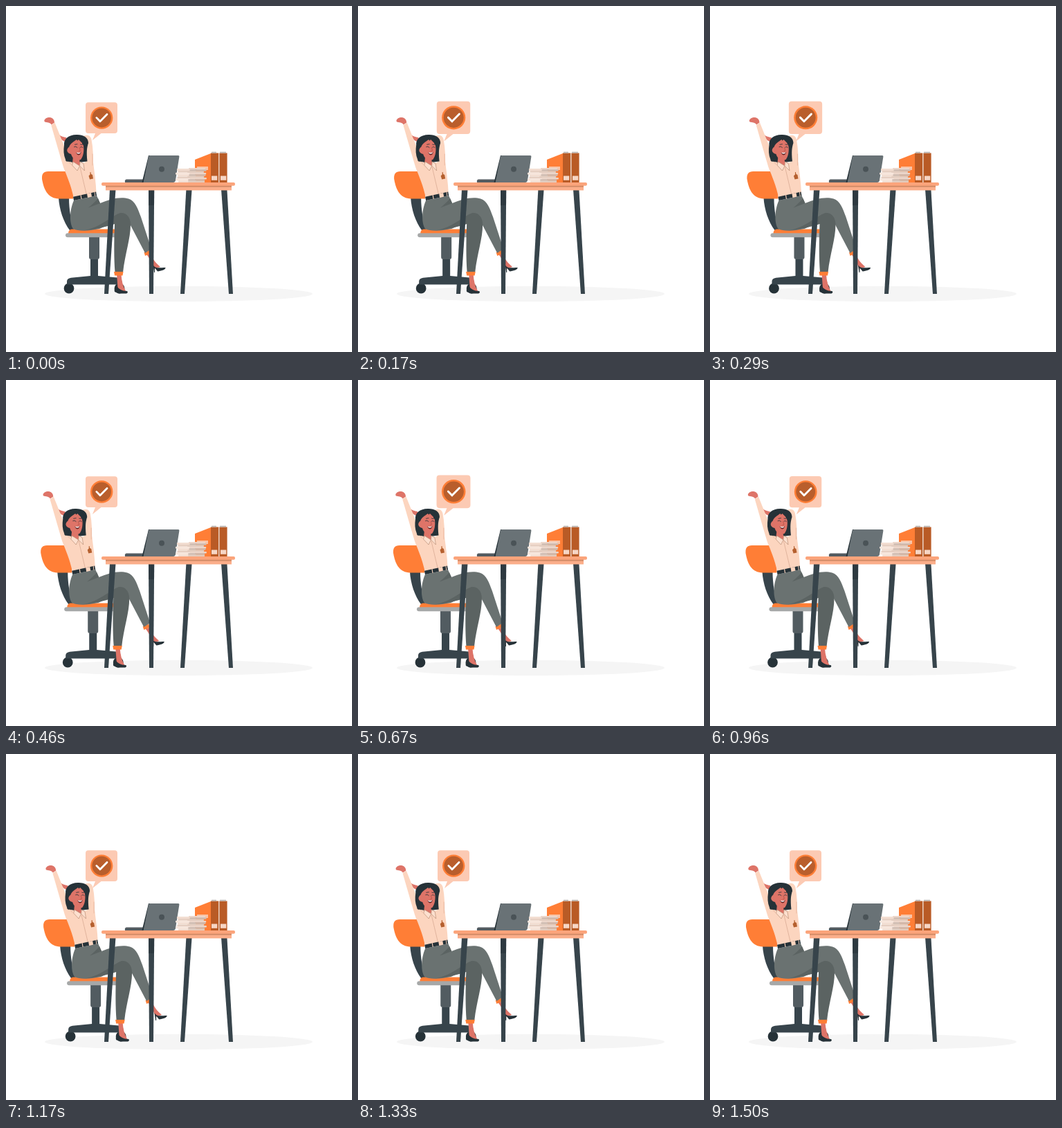
Recreate the animation shown at these times as an HTML page. Size 500 by 500 pixels, loop 1.54 s.

```html
<!DOCTYPE html>
<html lang="en">
<head>
<meta charset="utf-8">
<title>Task done</title>
<style>
  html, body { margin: 0; width: 100%; height: 100%; overflow: hidden; background: #fff; }
  svg { display: block; width: 100vw; height: 100vh; }
  .line { fill: none; stroke-linecap: round; stroke-linejoin: round; }
  .ink { fill: #263238; }
  .steel { fill: #37444b; }
  .orange { fill: #ff7e36; }
  .skin { fill: #de7468; }
  .shirt { fill: #fcd5bf; }
  .pants { fill: #6a7271; }
  .shade { fill: #5b6362; }
</style>
</head>
<body>
<svg viewBox="0 0 500 500">
  <ellipse cx="249.5" cy="416" rx="193.5" ry="11.2" fill="#f5f5f5"/>

  <g id="bubble">
    <path fill="#fccab3" d="M119 139.2H157Q161 139.2 161 143.2V180Q161 184 157 184H137.5L125 194L129 184H119Q115 184 115 180V143.2Q115 139.2 119 139.2Z"/>
    <circle class="orange" cx="138.2" cy="161.6" r="16.2"/>
    <circle cx="138.2" cy="161.6" r="13.8" fill="#b95e2c"/>
    <path class="line" stroke="#fff" stroke-width="2.8" d="M130.8 161.4L136 166.8L146 156.6"/>
  </g>

  <g id="worker">
    <!-- chair -->
    <path class="steel" d="M76 277H91C91 295 94 311 99 324H92C83 312 77 294 76 277Z"/>
    <path class="orange" d="M61 239H97V278.5H76C62 278 55 268 52 250Q51 239 61 239Z"/>
    <path fill="#525c61" d="M120 333H135V363Q135 366 132 366H123Q120 366 120 363Z"/>
    <circle class="ink" cx="91" cy="408" r="7.4"/>
    <circle class="ink" cx="164" cy="408" r="7.4"/>
    <path class="steel" d="M122 366H133V390L161 392.5Q168 393.5 168 402.5H88V398Q88 393.5 94 392.7L122 390Z"/>
    <path class="orange" d="M95 322.5H157V329H90Q90 323 95 322.5Z"/>
    <path fill="#a6a8a8" d="M89 328.3H158V334.2H89Q86 334 86 331.2T89 328.3Z"/>

    <!-- far foot and crossed leg -->
    <path class="skin" d="M203 359L209 358C212 366 217 372 223 377L214 380C212 374 209 366 203 359Z"/>
    <path class="ink" d="M212.5 374C216 380 221 378 230.5 378C231 381 224 383 219 383.5L215 378.5V385H214Z"/>
    <path class="orange" d="M199.5 356L208 352.5L209.2 357.5L201 361Z"/>
    <path class="pants" d="M98 281L131 274L136 285C150 279 165 275 177 278.5C187 282 190 292 195 305L210 351L201 357L180 317C176 304 167 303 157 312L135 322C120 325 105 326 97 322C92 315 91 297 98 281Z"/>
    <path class="shade" d="M119 291.5Q128 284 133 278L136 285Z"/>

    <!-- near leg -->
    <path class="skin" d="M160 388H166.5C167 397 169 405 173 412L162 413C161 404 161 397 160 388Z"/>
    <path class="ink" d="M159 403C157 407 156 410 157 413L163 415.5H174Q177 414 175 412C168 412 162 409 159 403Z"/>
    <path class="shade" d="M112 324.5C132 322 148 318 157 315C156 342 156 365 157.5 385H169C172 358 180 336 180 316C180 304 173 298 165 299C153 303 137 320 112 324.5Z"/>
    <path class="orange" d="M156 384H169.5L168.5 389.5H157Z"/>

    <!-- arms and torso -->
    <path class="skin" d="M77 186C80 189 83 189 87 190L89 196C84 197 79 194 77 186Z"/>
    <path class="shirt" d="M110 189C116 185 122 186 123.5 193C126 205 126 218 126 230L114 231L115 200Z"/>
    <path class="skin" d="M65.5 171.5C64 168 59 168.5 56 167.5C54 165 57 162 61 161C66 160.5 70 163 70 168.5Z"/>
    <path class="shirt" d="M65.3 172.3L70.5 168.5L86 207C88 218 92 226 99 227L117 226L126 226C128 242 130 256 130.5 270L98 278C94 259 88 246 83 233C77 213 71 192 65.3 172.3Z"/>
    <path class="line" stroke="#e5b49c" stroke-width=".8" d="M86 211Q88 224 94 229M125 214V230"/>

    <!-- belt -->
    <path class="ink" d="M97 275.8L130 268.5L131 274L98 281Z"/>
    <path fill="#fcd5bf" d="M107.5 273.4L108.6 273.1L109.5 278.7L108.4 279ZM117 271.3L123 270L124 275.6L118 276.9ZM127.5 269L128.4 268.8L129.2 274.5L128.3 274.7Z"/>

    <!-- head -->
    <path class="ink" d="M84 201C83 192 91 185.5 103 186C112 186 119 190 119 198C117 204 116 210 117.5 224.5L98 227C91 223 86 227 86 222C83 215 83 208 84 201Z"/>
    <path class="skin" d="M97 217L106 221L107 229L102 235L96 227Z"/>
    <path class="skin" d="M91 204C93 198 98 196 102 193C105 198 110 199 112 201C113 209 112 217 108 222C102 224 96 221 94 214C89 213 87 209 89 206Q90 204 91 204Z"/>
    <path class="ink" d="M88 206C91 195 97 190 103 193C108 194 112 199 113 206L117 199L111 190L99 187L88 193Z"/>
    <path class="skin" d="M100.5 197L105 193L110 198L110 202L101 202Z"/>
    <path class="line" stroke="#263238" stroke-width=".8" d="M98.5 203.5Q101 202 103 204.5M107.5 204Q109.5 202.5 111 204.5M99.5 200.2L103 199.6M107.5 200L110 200.6"/>
    <path class="line" stroke="#b65349" stroke-width=".8" d="M106 204.5L107.5 209L105.5 209.3"/>
    <path fill="#6b2b2b" d="M101 211.5Q105 213 108.5 211C108 216 103.5 217.5 101 211.5Z"/>
    <path fill="#fff" d="M101.5 211.6Q105 212.8 108 211.2Q107.5 213.4 105 213.6T101.5 211.6Z"/>

    <!-- collar and badge -->
    <path fill="#fde0cf" stroke="#b98e76" stroke-width=".7" d="M97 225L95.5 230L103 238L106.5 231ZM107 225L106.5 231L113.5 238L112 228Z"/>
    <path class="line" stroke="#d5a58e" stroke-width=".7" d="M107 233L116 271"/>
    <path fill="#b5602f" d="M121.5 240L122.4 240L123 243L125 244L126 249.5L121 250.5L119.5 245.5L121.5 243.5Z"/>
  </g>

  <!-- things on the table -->
  <path fill="#535b60" d="M174 250.4H199V255H172Q171 251 174 250.4Z"/>
  <path class="ink" d="M206 216H210L201 255H196.5Z"/>
  <path fill="#697276" d="M208 216H249Q250.7 216 250.4 217.7L245 252Q244.4 255 241.5 255H198.5L206 217.5Q206.4 216 208 216Z"/>
  <circle cx="225" cy="235.8" r="4" fill="#4a5357"/>

  <path class="orange" d="M273 222L296 213V255H273Z"/>
  <path fill="#f9c4a7" d="M276 232H292V237H276Z"/>
  <g fill="#b95b26"><path d="M296 212.4H307.3V255H296ZM308.4 212.4H319.6V255H308.4Z"/></g>
  <path fill="#b9b5b2" d="M297 210.7H304V212.4H297ZM309 210.7H318V212.4H309Z"/>
  <path fill="#f6d6c5" d="M297 245.6H305.3V251.8H297ZM310 245.6H318.3V251.8H310Z"/>
  <g id="papers"></g>

  <!-- table -->
  <g class="steel">
    <path d="M150 265H158.5L148 416H142Z"/>
    <path d="M206 265H214.2L213 416H207Z"/>
    <path d="M260.4 265H268.6L258 416H252Z"/>
    <path d="M311 265H319.4L328 416H322Z"/>
  </g>
  <path class="ink" opacity=".6" d="M206 266H214.2L214 288H206.2Z"/>
  <rect x="144" y="259" width="182" height="7.4" fill="#fbae8a"/>
  <rect x="144" y="259" width="182" height="2.6" fill="#d18a66"/>
  <rect x="138" y="255" width="193" height="4.8" rx="2" fill="#fba47b"/>
</svg>
<script>
  const LOOP = 1540, CYCLE = 1500;
  // [share of cycle, value]
  const SHAKE = [[0, 0], [.1, -1], [.2, 2], [.3, -4], [.4, 4], [.5, -4], [.6, 4], [.7, -4], [.8, 2], [.9, -1], [1, 0]];
  const BEAT = [[0, 1], [.14, 1.065], [.28, 1], [.42, 1.065], [.7, 1], [1, 1]];
  const PIVOT = [138, 166.5];

  const $ = id => document.getElementById(id);
  const linear = k => k;
  const smooth = k => k * k * (3 - 2 * k);

  function sample(steps, p, ease) {
    const i = Math.max(1, steps.findIndex(s => s[0] >= p));
    const [p0, v0] = steps[i - 1], [p1, v1] = steps[i];
    return v0 + (v1 - v0) * ease((p - p0) / (p1 - p0));
  }

  function stack(x, y, width, rows, colors) {
    const h = (255 - y) / rows;
    let out = '';
    for (let i = 0; i < rows; i++) {
      const dx = Math.sin(i * 2.3) * 2;
      out += `<rect x="${x + dx}" y="${y + i * h}" width="${width}" height="${h + .1}" rx=".8" fill="${colors[i % colors.length]}"/>`;
    }
    return out;
  }
  $('papers').innerHTML =
    stack(247, 235, 26, 7, ['#f3ded2', '#e6cfc2', '#f7e6dc']) +
    stack(264, 234, 24, 9, ['#ecd6ca', '#cdbbb1', '#e3cdc0']);

  function draw(now) {
    const t = now % LOOP;
    const x = .2 + sample(SHAKE, (t + 28) % CYCLE / CYCLE, linear);
    const s = sample(BEAT, Math.min(1, Math.max(0, t - 15) / CYCLE), smooth);
    const [cx, cy] = PIVOT;
    $('worker').setAttribute('transform', `translate(${x} 0)`);
    $('bubble').setAttribute('transform', `translate(${cx} ${cy}) scale(${s}) translate(${-cx} ${-cy})`);
  }

  let start;
  function tick(now) {
    start ??= now;
    draw(now - start);
    requestAnimationFrame(tick);
  }
  draw(0);
  requestAnimationFrame(tick);
</script>
</body>
</html>
```
